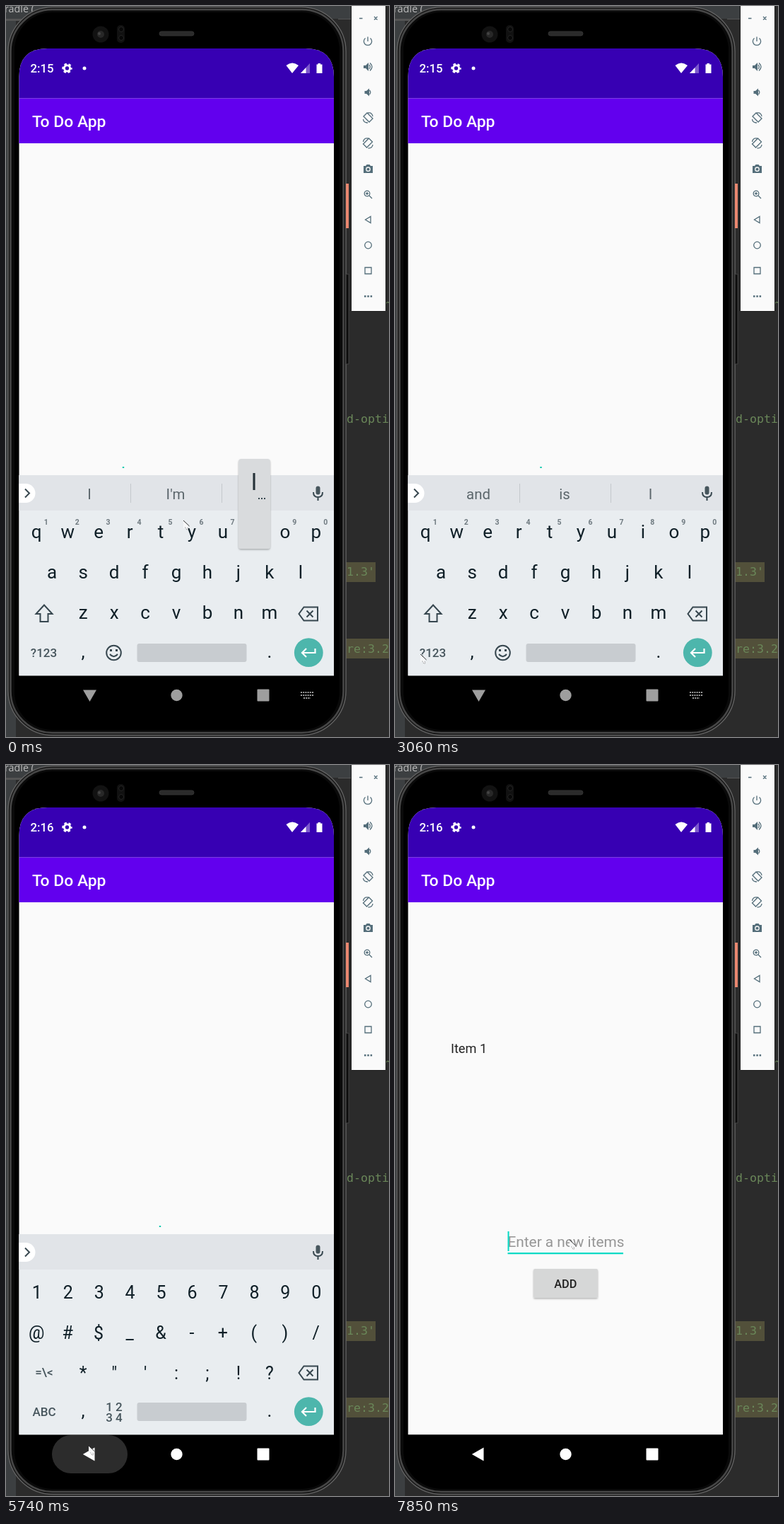
Animation of 542 by 1033 pixels, one loop 7.99 s. Source, as an HTML page:

```html
<!DOCTYPE html>
<html lang="en">
<head>
<meta charset="utf-8">
<title>To Do App</title>
<style>
html, body { margin: 0; width: 100%; height: 100%; overflow: hidden; background: #2b2b2b; }
svg { display: block; width: 100%; height: 100%; font-family: Roboto, sans-serif; }
.code { font: 16.6px "DejaVu Sans Mono", monospace; fill: #6a8759; }
.mid { text-anchor: middle; }
.key { font-size: 26px; fill: #0f1f27; }
.sym { font-size: 25px; fill: #0f1f27; }
.small { font-size: 17px; font-weight: 500; fill: #47565d; }
.hint { font-size: 10.5px; font-weight: 700; fill: #6f7a80; }
.suggest { font-size: 20.4px; fill: #5b666b; }
.line { fill: none; stroke: #37474f; stroke-width: 2; }
.tool { fill: none; stroke: #546e7a; stroke-width: 1.3; }
.solid { fill: #546e7a; }
</style>
</head>
<body>
<svg viewBox="0 0 542 1033" xml:space="preserve">
  <defs>
    <clipPath id="screen"><path d="M18.500 946.200V100Q18.500 60 58.500 60H424Q464 60 464 100V946.200Z"/></clipPath>
    <filter id="shadow" x="-20%" y="-20%" width="140%" height="140%">
      <feDropShadow dx="0" dy="1.5" stdDeviation="1.1" flood-opacity=".28"/>
    </filter>
  </defs>

  <!-- editor behind the phone -->
  <path fill="#2b2b2b" d="M0 0H542V1033H0Z"/>
  <path fill="#3c3f41" d="M0 0H488V18H0ZM0 18H14V1033H0Z"/>
  <path fill="#555" d="M0 18H30V21H0ZM470 18H488V19H470Z"/>
  <text x="-2" y="9" font-size="14.300" fill="#bbb" font-family="Open Sans, sans-serif">radle (</text>
  <path fill="#52503a" d="M481 786H523V814H481ZM481 894H542V922H481Z"/>
  <text class="code" x="482" y="589">d-opti</text>
  <text class="code" x="482" y="805">1.3'</text>
  <text class="code" x="482" y="914">re:3.2</text>
  <text class="code" x="535" y="427">n</text>

  <!-- phone -->
  <rect x="3" y="1.500" width="478" height="1029" rx="63" fill="#141414" stroke="#606060" stroke-width="1.500"/>
  <rect x="6.500" y="5" width="471" height="1022" rx="59" fill="#0a0a0a" stroke="#474747" stroke-width="2.500"/>
  <rect x="12" y="9" width="460" height="1014" rx="54"/>
  <path fill="#e9876f" d="M481 251H485V314H481Z"/>
  <path fill="#0c0c0c" stroke="#444" d="M481.500 379H485V506H481.500"/>
  <circle cx="134" cy="40" r="11.500" fill="#121212"/><circle cx="134" cy="40" r="5" fill="#282828"/>
  <circle cx="132" cy="39" r="2" fill="#444"/>
  <rect x="157" y="27" width="11" height="25" rx="5" fill="#111"/>
  <g fill="#080808" stroke="#242424"><circle cx="163" cy="33" r="3.500"/><circle cx="163" cy="45" r="3.500"/></g>
  <rect x="217" y="36" width="49" height="6" rx="3" fill="#2b2b2b" stroke="#333"/>

  <g clip-path="url(#screen)">
    <path fill="#fafafa" d="M18 60H465V947H18Z"/>
    <path fill="#3700b3" d="M18 60H465V130.400H18Z"/>
    <path fill="#6200ee" d="M18 130.400H465V193.900H18Z"/>
  </g>
  <g fill="#fff">
    <text id="clock" x="34.500" y="94" font-size="16.800" font-weight="500"></text>
    <circle cx="86.500" cy="88" r="4.100" fill="none" stroke="#fff" stroke-width="2.900"/>
    <circle cx="86.500" cy="88" r="6" fill="none" stroke="#fff" stroke-width="2.400" stroke-dasharray="3.400 2.880" stroke-dashoffset="1.700"/>
    <circle cx="111" cy="88" r="2.500"/>
    <path d="M396.500 84Q405 77 414 84L405 95Z"/>
    <path opacity=".35" d="M430 81V95H417Z"/><path d="M424.500 87V95H417Z"/>
    <path d="M441.500 81H445V82.500H447.500V95H439.500V82.500H441.500Z"/>
    <text x="37" y="171" font-size="22.900" font-weight="500">To Do App</text>
  </g>

  <!-- form -->
  <g id="form">
    <text id="listed" x="79" y="406.500" font-size="18.150" fill="#212121">Item 1</text>
    <text id="field" x="159.500" y="681" font-size="20.800"></text>
    <path fill="#03dac5" d="M159.500 689H323V691.200H159.500Z"/>
    <path id="caret" fill="#03dac5" d="M159.500 659H161.500V687H159.500Z"/>
    <rect id="add" x="196" y="712" width="91" height="41" rx="2" fill="#d6d7d7" filter="url(#shadow)"/>
    <text class="mid" x="241.300" y="738.500" font-size="16.300" font-weight="500" fill="#212121">ADD</text>
  </g>

  <!-- keyboard -->
  <path id="tip" fill="#12c9ae" d="M-1.200 651H1.200V653H-1.200Z"/>
  <g id="board">
    <path fill="#e9edf0" d="M18.500 663H464V946.200H18.500Z"/>
    <path fill="#e1e4e8" d="M18.500 663H464V713H18.500Z"/>
    <path fill="#fff" d="M18.500 675H28A13.500 13.500 0 0 1 28 702H18.500Z"/>
    <path class="line" d="M27 682.500L33 688.500L27 694.500"/>
    <g id="suggestions">
      <path stroke="#c3c8cc" d="M176.500 675V702M305.500 675V702"/>
      <text class="suggest mid" x="118" y="697"></text>
      <text class="suggest mid" x="240" y="697"></text>
      <text class="suggest mid" x="361.500" y="697"></text>
    </g>
    <rect x="438.500" y="678.500" width="6" height="12" rx="3" fill="#47565d"/>
    <path class="line" stroke="#47565d" d="M435 687Q435 694 441.500 694T448 687M441.500 694V699"/>
    <g id="letters">
      <path class="line" stroke="#47565d" d="M54 846.500L42.500 859H48.500V870H59.500V859H65.500Z"/>
      <text class="small mid" x="53.500" y="920">?123</text>
      <circle class="line" cx="152.500" cy="914" r="10.300"/>
      <path class="line" d="M147 916Q152.500 922.500 158 916"/>
      <path fill="#37474f" d="M147 909H150V912H147ZM155 909H158V912H155Z"/>
    </g>
    <g id="symbols">
      <text class="small mid" x="54" y="864">=\&lt;</text>
      <text class="small mid" x="54" y="920">ABC</text>
      <text class="small mid" x="153" y="912.500">1 2</text>
      <text class="small mid" x="153" y="927.500">3 4</text>
    </g>
    <path class="line" d="M421.500 849.500H441V868.500H421.500L414.500 859ZM425.500 854.500L434.500 863.500M434.500 854.500L425.500 863.500"/>
    <text class="key mid" x="109" y="921">,</text>
    <text class="key mid" x="373" y="921">.</text>
    <rect x="185.500" y="901" width="155" height="26" rx="3" fill="#c8ccd0"/>
    <circle cx="428.300" cy="913.700" r="20.400" fill="#4db6ac"/>
    <path fill="none" stroke="#fff" stroke-width="2.200" d="M437.500 908V914H419.500M425 908L419 914L425 920"/>
    <g id="popup">
      <rect x="-22" y="640" width="45" height="127" rx="4" fill="#d9dbdd" filter="url(#shadow)"/>
      <text class="mid" y="684" font-size="33" fill="#263238"></text>
      <path fill="#37474f" d="M6 695h2v2h-2zm4 0h2v2h-2zm4 0h2v2h-2z"/>
    </g>
  </g>

  <!-- navigation -->
  <rect id="ripple" x="65" y="947" width="107" height="54" rx="27" fill="#2c2c2c"/>
  <g id="nav">
    <path id="hide" d="M109 966.500H128L118.500 983Z"/>
    <path id="back" d="M125.500 964.500V983.500L108.800 974Z"/>
    <circle cx="241.500" cy="974" r="8.200"/>
    <rect x="355.500" y="965.500" width="17" height="17" rx="1"/>
    <path id="switcher" fill="none" stroke="#9e9e9e" stroke-width="2" d="M417 970H435M417 974H435M421 978H431" stroke-dasharray="2 1.200"/>
  </g>

  <!-- emulator tools -->
  <path fill="#fafafa" stroke="#1c1c1c" d="M488.500 -1H537.500V431.500H488.500Z"/>
  <g class="tool">
    <path d="M500 17.500H504.500M521 15L525.500 19.500M525.500 15L521 19.500"/>
    <path d="M512 43.500V50M508.500 45.500A5.600 5.600 0 1 0 515.500 45.500"/>
    <path d="M514 83Q516.500 86 514 89M515 80.500Q521 86 515 91.500M514.500 119Q517 122 514.500 125"/>
    <path id="rotate" d="M506 156L511 151L519 159L514 164ZM512 151Q518 150 519 156M512 165Q506 165 505.500 160"/>
    <use href="#rotate" transform="matrix(-1 0 0 1 1024.500 36)"/>
    <circle cx="511" cy="265" r="3.800"/>
    <path d="M514 268L518 272M509 265H513M511 263V267M516 297.500V306.500L508.500 302Z"/>
    <circle cx="512.500" cy="338" r="4.800"/>
    <path d="M508 369.500H517V378.500H508Z"/>
  </g>
  <path class="solid" d="M506 84H509L513 80V92L509 88H506ZM507.500 120H510L514 116.500V127.500L510 124H507.500ZM506 226H509L510.500 224H514.500L516 226H519V236H506Z"/>
  <circle cx="512.500" cy="230.700" r="2.700" fill="#546e7a" stroke="#fafafa" stroke-width="1.300"/>
  <path class="solid" d="M507 409h2.500v2.500h-2.500zm4.300 0h2.500v2.500h-2.500zm4.300 0h2.500v2.500h-2.500z"/>

  <g id="mouse">
    <path fill="#f6f7f8" d="M0 0V11.500L3 9.500L5 13.500L7 12.500L5.500 8.500L8.500 8Z"/>
    <path fill="none" stroke="#333" d="M0 0L8.500 8"/>
    <path fill="none" stroke="#777" stroke-width=".8" stroke-dasharray="1.500 1.200" d="M2.500 9.500L5 13.500L7 12.500L5.500 9"/>
  </g>
</svg>
<script>
const LOOP = 7990, STEP = LOOP / 60;
const $ = id => document.getElementById(id);
const show = (id, on) => { $(id).style.display = on ? '' : 'none'; };
const place = (id, x, y) => $(id).setAttribute('transform', `translate(${x} ${y})`);

function addRow(group, chars, x, y, type) {
  [...chars].forEach((char, i) => {
    const add = (text, cls, dx, py) => {
      const el = document.createElementNS('http://www.w3.org/2000/svg', 'text');
      el.setAttribute('class', cls + ' mid');
      el.setAttribute('x', x + 43.95 * i + dx);
      el.setAttribute('y', py);
      el.textContent = text;
      $(group).append(el);
    };
    add(char, type, 0, y);
    if (chars.length === 10 && type === 'key') add((i + 1) % 10, 'hint', 13.5, 733);
  });
}
addRow('letters', 'qwertyuiop', 43.2, 751.5, 'key');
addRow('letters', 'asdfghjkl', 65.2, 808.5, 'key');
addRow('letters', 'zxcvbnm', 109.2, 865.5, 'key');
addRow('symbols', '1234567890', 43.8, 753.5, 'sym');
addRow('symbols', '@#$_&-+()/', 43.2, 810.5, 'sym');
addRow('symbols', '*"\':;!?', 109.2, 867.5, 'sym');

const suggestions = [
  [0, 'I', "I'm", "I'll"], [660, 'It', "It's", 'Its'], [1450, 'Ite', 'Item', 'Items'],
  [2250, 'Item', 'Items', "Item's"], [2650, 'and', 'is', 'I'], [4510, '', '', '']
];
// start, end, character, centre, drop below the top row
const presses = [
  [0, 100, 'I', 351, 0], [530, 780, 't', 219, 0], [1320, 1580, 'e', 130, 0],
  [1850, 2110, 'm', 373, 115], [4380, 4640, '1', 44, 0]
];
// time of the last edit and caret position
const edits = [[0, 166], [650, 173], [1340, 184], [2000, 201], [2650, 206.5], [4490, 218], [6780, 160.5]];
const path = [
  [0, 251, 727], [400, 222, 738], [680, 220, 740], [1198, 126, 740], [1340, 126, 740],
  [1860, 368, 852], [2130, 368, 852], [2530, 262, 908], [2760, 250, 908], [3063, 36, 916],
  [3330, 36, 916], [3960, 48, 738], [4261, 48, 738], [4660, 50, 740], [5330, 110, 955],
  [5600, 117, 962], [5860, 117, 962], [5993, 251, 787], [6500, 251, 792], [6780, 240, 733],
  [7060, 240, 733], [7590, 247, 671], [LOOP, 247, 671]
];
const latest = (list, t) => list.filter(item => item[0] <= t).pop();

function mouseAt(t) {
  const i = path.findIndex(p => p[0] > t);
  const [t0, x0, y0] = path[i - 1], [t1, x1, y1] = path[i];
  const k = (t - t0) / (t1 - t0), ease = k * k * (3 - 2 * k);
  return [x0 + (x1 - x0) * ease, y0 + (y1 - y0) * ease];
}

function draw(time) {
  const t = Math.min(59, Math.floor((time + 22) / STEP)) * STEP + 0.5;
  const open = t < 5900, numeric = t > 3400, leaving = t > 5580, added = t > 6780;
  const [editTime, caretX] = latest(edits, t);
  const blink = (t - editTime) % 1000 < 500;

  $('clock').textContent = t < 3720 ? '2:15' : '2:16';
  show('board', open);
  show('form', !open);
  show('letters', !numeric);
  show('symbols', numeric);
  show('suggestions', t < 4510);
  const words = latest(suggestions, t).slice(1);
  $('suggestions').querySelectorAll('text').forEach((el, i) => { el.textContent = words[i]; });

  const press = presses.find(p => t >= p[0] && t < p[1]);
  show('popup', press);
  if (press) {
    place('popup', press[3], press[4]);
    $('popup').querySelector('text').textContent = press[2];
  }
  show('tip', open && blink);
  place('tip', caretX, 0);

  show('listed', added);
  $('field').textContent = added ? 'Enter a new items' : 'Item 1';
  $('field').setAttribute('fill', added ? '#969696' : '#212121');
  show('caret', blink);
  place('caret', caretX - 160.5, 0);
  $('add').setAttribute('fill', t > 6750 && t < 7000 ? '#c6c8c8' : '#d6d7d7');

  $('nav').setAttribute('fill', leaving ? '#fff' : '#9e9e9e');
  show('hide', !leaving);
  show('back', leaving);
  show('switcher', !leaving);
  $('ripple').setAttribute('opacity', t < 5450 || t > 6100 ? 0 : t < 5800 ? 1 : t < 5950 ? 0.6 : 0.25);
  place('mouse', ...mouseAt(t));
}

const start = performance.now();
function tick() {
  draw((performance.now() - start) % LOOP);
  requestAnimationFrame(tick);
}
tick();
</script>
</body>
</html>
```
